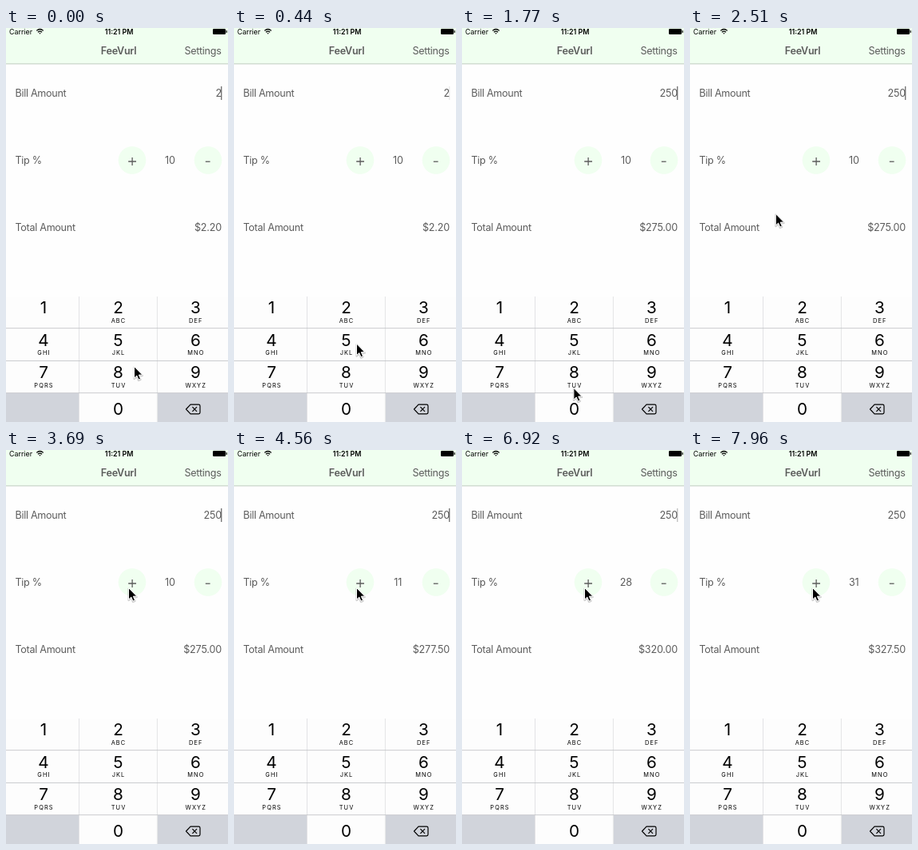
An HTML page that plays this animation: 278x493 px, repeating every 8 s.

```html
<!DOCTYPE html>
<html lang="en">
<head>
<meta charset="utf-8">
<title>Tip calculator</title>
<style>
html, body { margin: 0; width: 100%; height: 100%; overflow: hidden; background: #fff; }
svg { display: block; width: 100%; height: 100%; }
text { font-family: Inter, Roboto, sans-serif; }
.ui { font-size: 12.6px; letter-spacing: -.3px; fill: #5c5c5c; }
.num { letter-spacing: -.18px; }
.bar { font-size: 8.9px; }
.bold { font-weight: 600; }
.end { text-anchor: end; }
.mid { text-anchor: middle; }
.digit { font-size: 20.7px; }
.abc { font-size: 7.4px; letter-spacing: 1.1px; }
.line { fill: none; stroke: #000; stroke-width: 1.2; }
.sign { stroke: #5c5c5c; stroke-width: 1.3; }
</style>
</head>
<body>
<svg viewBox="0 0 278 493">
  <rect width="278" height="493" fill="#fefefe"/>
  <rect width="278" height="45" fill="#f0fff0"/>
  <rect y="44.5" width="278" height=".8" fill="#b4bdb4"/>

  <text class="bar" x="4" y="8">Carrier</text>
  <g class="line">
    <path d="M38.2 3.4Q42.5 -.4 46.8 3.4M39.9 5.2Q42.5 3 45.1 5.2"/>
    <path d="M41.2 6.3H43.8L42.5 7.8Z" fill="#000" stroke="none"/>
  </g>
  <text class="bar bold mid" x="141.6" y="8">11:21 PM</text>
  <rect x="259" y="1" width="16" height="7" rx="1.3"/>
  <rect x="275.6" y="3" width="1.2" height="3" rx=".6"/>

  <text class="ui bold mid" x="141" y="33">FeeVurl</text>
  <text class="ui end" x="269.5" y="33">Settings</text>

  <text class="ui" x="11.5" y="86">Bill Amount</text>
  <text class="ui" x="11.5" y="170">Tip %</text>
  <text class="ui" x="11.5" y="254">Total Amount</text>
  <circle cx="158" cy="165.5" r="17.3" fill="#f0fff0"/>
  <circle cx="253" cy="165.5" r="17.3" fill="#f0fff0"/>
  <path id="plus" class="sign" d="M153.2 167H163M158.1 162.1V171.9"/>
  <path class="sign" d="M249.8 167.2H255.6"/>
  <text id="bill" class="ui num end" x="270" y="86"></text>
  <text id="tip" class="ui num mid" x="205.3" y="170"></text>
  <text id="total" class="ui num end" x="270" y="254"></text>
  <rect id="caret" x="269.2" y="73" width="1.1" height="17" fill="#555"/>

  <g id="pad"></g>
  <g id="pointer" stroke-linejoin="round">
    <path d="M0 1V15.6L3.3 12.5L5.5 17.6L8 16.5L5.8 11.6H10.3Z" stroke="#000" stroke-width="2.2" opacity=".18"/>
    <path d="M0 0V14.6L3.3 11.5L5.5 16.6L8 15.5L5.8 10.6H10.3Z" stroke="#fff"/>
  </g>
</svg>
<script>
const LOOP = 8000, STEP = 147.2;
const $ = id => document.getElementById(id);

// Keypad
const letters = ['', 'ABC', 'DEF', 'GHI', 'JKL', 'MNO', 'PQRS', 'TUV', 'WXYZ'];
const cols = [47, 140.5, 237.3];
const label = (cls, x, y, s) => `<text class="${cls} mid" x="${x}" y="${y}">${s}</text>`;
const box = (x, y, w, h, fill, id = '') =>
  `<rect id="${id}" x="${x}" y="${y}" width="${w}" height="${h}" fill="${fill}"/>`;

function buildPad() {
  const blank = '#d1d4db';
  let out = box(0, 336, 278, 157, '#fdfdfd') +
    box(0, 457, 91, 36, blank) + box(190, 457, 88, 36, blank) +
    box(92, 376, 97, 40, blank, 'key5');
  for (const x of [91.2, 188.9]) out += box(x, 336, .8, 157, '#dcdddf');
  for (const y of [375.3, 416, 456.3]) out += box(0, y, 278, .8, '#bfc1c5');
  letters.forEach((s, i) => {
    const x = cols[i % 3], y = 357 + 40.5 * Math.floor(i / 3);
    out += label('digit', x, y, i + 1) + label('abc', x + .5, y + 11.7, s);
  });
  out += label('digit', cols[1], 484.3, 0);
  out += `<path class="line" stroke-linejoin="round"
    d="M225.5 477L231 471.2H241.3Q243 471.2 243 472.9V481.1Q243 482.8 241.3 482.8H231ZM233.4 474.2L239 479.8M239 474.2L233.4 479.8"/>`;
  $('pad').innerHTML = out;
}

// Each row: start time, value
const bills = [[0, 2], [720, 25], [1310, 250]];
const tips = [[0, 10], [4250, 11], [4850, 12], [6180, 28], [7060, 29], [7350, 30], [7790, 31]];
const presses = [4110, 4700, 6030, 6930, 7200, 7640];
// Each row: time, x, y
const path = [
  [0, 160.5, 423.5], [450, 153.5, 395], [740, 153.5, 395], [1250, 146, 470],
  [1650, 146, 470], [2200, 93, 300], [2500, 107.3, 232.5], [2810, 149.5, 181],
  [3090, 151, 173], [3300, 151, 173], [3500, 153.5, 172.5], [LOOP, 153.5, 172.5]
];

const valueAt = (rows, t) => rows.filter(r => r[0] <= t).pop()[1];

function pointerAt(t) {
  const i = path.findIndex(p => p[0] > t);
  const [t0, x0, y0] = path[i - 1], [t1, x1, y1] = path[i];
  const p = (t - t0) / (t1 - t0), e = p * p * (3 - 2 * p);
  return [x0 + (x1 - x0) * e, y0 + (y1 - y0) * e];
}

function caretAt(t) {
  const phase = (t + 390) % 960;
  if (phase < 500) return 1;
  if (phase < 660) return 1 - (phase - 500) / 160;
  return Math.max(0, (phase - 810) / 150);
}

function draw(time) {
  // The screen refreshes in even steps
  const t = Math.floor((time + 12) / STEP) * STEP % LOOP;
  const bill = valueAt(bills, t), tip = valueAt(tips, t);
  const pressed = presses.some(p => t > p && t < p + 145);
  $('bill').textContent = bill;
  $('tip').textContent = tip;
  $('total').textContent = '$' + (bill * (100 + tip) / 100).toFixed(2);
  $('caret').setAttribute('opacity', caretAt(t));
  $('plus').setAttribute('opacity', pressed ? .35 : 1);
  $('key5').setAttribute('opacity', t > 580 && t < 720 ? 1 : 0);
  $('pointer').setAttribute('transform', `translate(${pointerAt(t)})`);
}

buildPad();
const start = performance.now();
(function tick() {
  draw((performance.now() - start) % LOOP);
  requestAnimationFrame(tick);
})();
</script>
</body>
</html>
```
